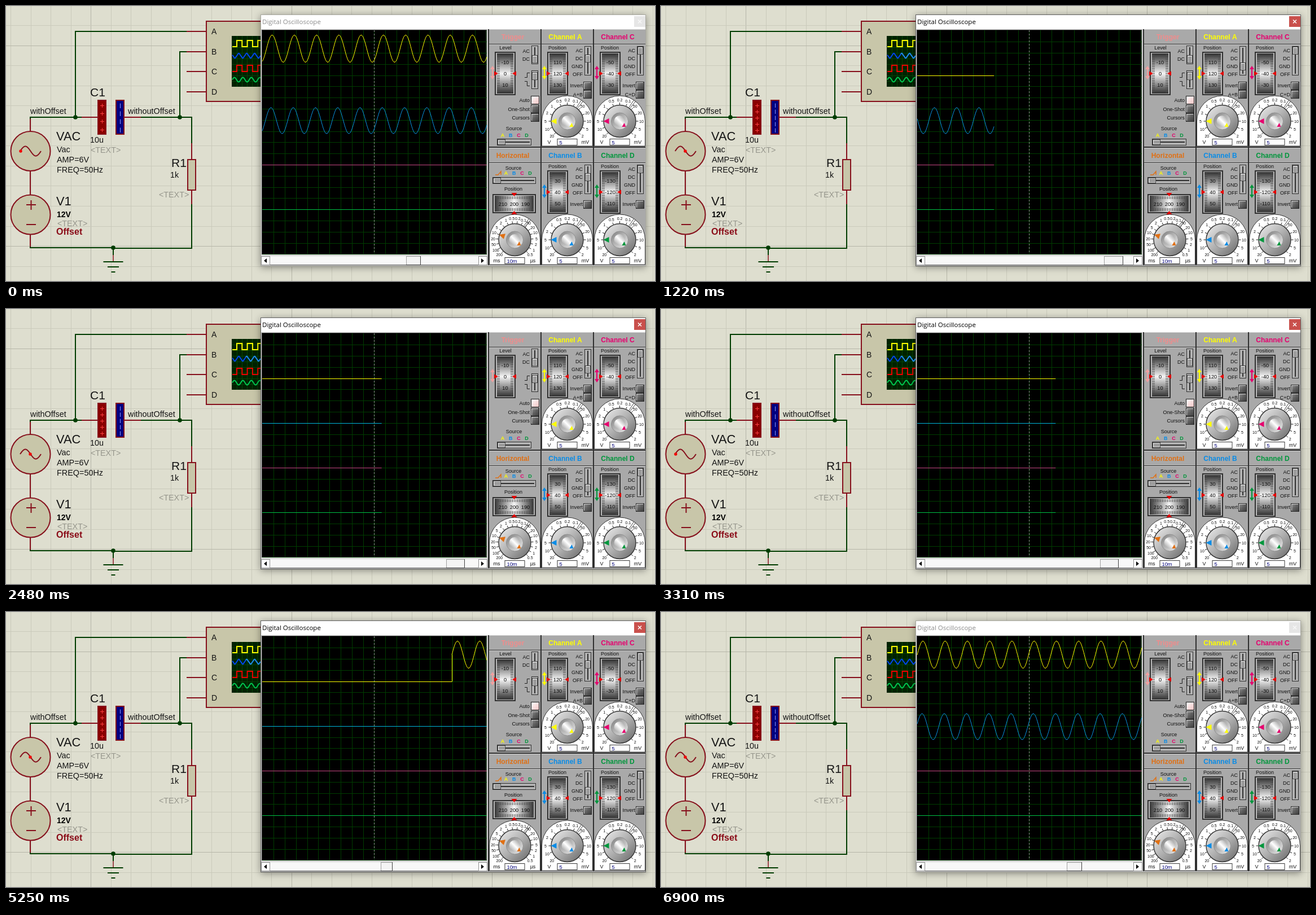
Recreate the animation shown at these times as an HTML page with a canvas. Size 1150 px wide and 487 px high, loop 6960 ms.

```html
<!DOCTYPE html>
<html lang="en">
<head>
<meta charset="utf-8">
<title>Capacitor blocking a DC offset</title>
<style>
  html, body { margin: 0; width: 100%; height: 100%; overflow: hidden; background: #dedecf; }
  canvas { display: block; }
</style>
</head>
<body>
<canvas id="stage" width="1150" height="487"></canvas>
<script>
const LOOP = 6960, TAU = Math.PI * 2;
const SANS = '"Liberation Sans", Arial, sans-serif';
const MAROON = '#86101c', WIRE = '#003c00', BODY = '#c8c6a9', PANEL = '#a9a9a9';
const YELLOW = '#ffff00', BLUE = '#0a8ce6', PINK = '#e6006e', GREEN = '#00963c', ORANGE = '#e07014';
const screen = { x: 454, y: 43, size: 398, div: 19.8, period: 39.45 };

const stage = document.getElementById('stage').getContext('2d');
const backdrop = document.createElement('canvas');
backdrop.width = 1150;
backdrop.height = 487;
let g = backdrop.getContext('2d');

// ---- drawing helpers ----
function box(x, y, w, h, fill, stroke, width = 1) {
  if (fill) { g.fillStyle = fill; g.fillRect(x, y, w, h); }
  if (stroke) {
    g.strokeStyle = stroke;
    g.lineWidth = width;
    g.strokeRect(x + width / 2, y + width / 2, w - width, h - width);
  }
}
function trace(points, color, width = 1) {
  g.beginPath();
  points.forEach(([x, y]) => g.lineTo(x, y));
  g.strokeStyle = color;
  g.lineWidth = width;
  g.stroke();
}
const line = (x1, y1, x2, y2, color, width) => trace([[x1, y1], [x2, y2]], color, width);
function polygon(points, fill) {
  g.beginPath();
  points.forEach(([x, y]) => g.lineTo(x, y));
  g.fillStyle = fill;
  g.fill();
}
function circle(x, y, r, fill, stroke, width = 1) {
  g.beginPath();
  g.arc(x, y, r, 0, TAU);
  if (fill) { g.fillStyle = fill; g.fill(); }
  if (stroke) { g.strokeStyle = stroke; g.lineWidth = width; g.stroke(); }
}
function text(s, x, y, size, color = '#141414', align = 'left', weight = '', family = SANS) {
  g.font = `${weight} ${size}px ${family}`;
  g.textAlign = align;
  g.fillStyle = color;
  g.fillText(s, x, y);
}
function curve(from, to, f, color, width) {
  const points = [];
  for (let x = from; x < to; x++) points.push([x, f(x)]);
  points.push([to, f(to)]);
  trace(points, color, width);
}
// Triangle whose tip points along the angle (y axis downwards)
function arrow(x, y, angle, length, half, color) {
  const c = Math.cos(angle), s = Math.sin(angle);
  polygon([[x + c * length, y + s * length], [x - s * half, y + c * half], [x + s * half, y - c * half]], color);
}
function gradient(x1, y1, x2, y2, ...colors) {
  const fill = g.createLinearGradient(x1, y1, x2, y2);
  colors.forEach((c, i) => fill.addColorStop(i / (colors.length - 1), c));
  return fill;
}

// ---- schematic ----
function drawGrid() {
  box(0, 0, 1150, 487, '#dedecf');
  const shade = major => major ? '#b6b6a8' : '#cacabb';
  for (let i = 0; i < 33; i++) box(Math.round(8 + i * 35.55), 0, 1, 487, shade(i % 10 === 4));
  for (let i = 0; i < 13; i++) box(0, Math.round(34 + i * 35.55), 1150, 1, shade(i % 10 === 1));
}
function drawSchematic() {
  trace([[320, 45], [123, 45], [123, 197]], WIRE, 2);
  trace([[43, 206], [43, 197], [134, 197]], WIRE, 2);
  trace([[238, 197], [329, 197], [329, 244]], WIRE, 2);
  trace([[308, 197], [308, 81], [322, 81]], WIRE, 2);
  trace([[329, 350], [329, 429], [190, 429], [190, 428], [43, 428], [43, 420]], WIRE, 2);
  line(190, 428, 190, 441, WIRE, 2);
  line(190, 441, 190, 453, MAROON, 1.5);
  [[17.5, 453], [10, 462], [3.5, 471]].forEach(([half, y]) => line(190 - half, y, 190 + half, y, WIRE, 2));
  [[123, 197], [308, 197], [190, 428]].forEach(([x, y]) => circle(x, y, 3.8, WIRE));

  [[43, 200, 43, 223], [43, 292, 43, 334], [43, 404, 43, 426], [134, 197, 162, 197], [210, 197, 239, 197],
   [329, 243, 329, 272], [329, 326, 329, 351]].forEach(p => line(...p, MAROON, 2));

  circle(43.5, 257, 35, BODY, MAROON, 2);
  circle(43.5, 369.5, 35, BODY, MAROON, 2);
  line(36, 352, 53, 352, MAROON, 2);
  line(44.5, 344, 44.5, 361, MAROON, 2);
  line(36, 387, 53, 387, MAROON, 2);
  curve(25, 62, x => 257 - 8.5 * Math.sin((x - 25) / 37 * TAU), MAROON, 2);
  box(321, 271, 16, 56, BODY, MAROON, 2);
  box(162, 166, 16, 62, '#8a0000', MAROON, 2);
  box(194, 166, 16, 62, '#000080', MAROON, 2);

  box(354, 26, 110, 144, BODY, MAROON, 2);
  ['A', 'B', 'C', 'D'].forEach((name, i) => {
    const y = Math.round(45 + i * 35.6);
    line(320, y, 355, y, MAROON, 2);
    text(name, 364, y + 5, 14);
  });
  box(400, 53, 60, 90, '#002200');
  for (let i = 1; i < 9; i++) {
    box(400 + i * 9, 53, 1, 90, '#064206');
    box(400, 53 + i * 10, 60, 1, '#064206');
  }
  for (const [y, color] of [[61, YELLOW], [105, '#f00000']]) {
    const points = [[401, y + 11]];
    for (let i = 0; i < 6; i++) {
      const x = 409 + i * 9.3, up = i % 2 ? 0 : 11;
      points.push([x, y + up], [x, y + 11 - up]);
    }
    trace(points, color, 2);
  }
  curve(401, 452, x => 130.5 - 4 * Math.sin((x - 401) / 15 * TAU), '#00c850', 2);

  text('VAC', 89, 238, 21.8);
  text('V1', 89, 353, 21.8);
  text('C1', 149, 160, 21);
  text('R1', 293, 285, 21);
  [['withOffset', 43, 191], ['withoutOffset', 216, 191], ['Vac', 90, 259], ['AMP=6V', 90, 277],
   ['FREQ=50Hz', 90, 295], ['10u', 149, 242], ['1k', 291, 304]].forEach(([s, x, y]) => text(s, x, y, 14.4));
  [[150, 260], [271, 339], [91, 390]].forEach(([x, y]) => text('<TEXT>', x, y, 14.3, '#96968c'));
  text('12V', 90, 374, 14, '#000', 'left', 'bold');
  text('Offset', 89, 405, 16, '#8a0c18', 'left', 'bold');
}

// ---- instrument panel ----
function slider(x, y, w, h, knob) {
  const tall = h > w;
  box(x, y, w, h, '#b2b2b2', '#303030');
  if (tall) box(x + w / 2 - 1, y + 3, 2, h - 6, '#303030');
  else box(x + 3, y + h / 2 - 1, w - 6, 2, '#303030');
  if (tall) {
    box(x + 1, knob - 7, w - 2, 14, '#d8d8d8', '#404040');
    for (let i = -4; i <= 4; i += 2) box(x + 3, knob + i, w - 6, 1, '#606060');
  } else {
    box(knob - 7, y + 1, 14, h - 2, '#d8d8d8', '#404040');
    for (let i = -4; i <= 4; i += 2) box(knob + i, y + 3, 1, h - 6, '#606060');
  }
}
function button(x, y, lit) {
  box(x, y, 15, 15, lit ? gradient(x, y, x + 15, y + 15, '#ffffff', '#f0c0c0') :
    gradient(x, y, x + 15, y + 15, '#9a9a9a', '#606060', '#383838'), '#282828');
  trace([[x + 1.5, y + 13], [x + 1.5, y + 1.5], [x + 13, y + 1.5]], '#d8d8d8');
}
function wheel(x, y, w, h, values) {
  const tall = h > w, shades = ['#202020', '#8c8c8c', '#f4f4f4', '#8c8c8c', '#202020'];
  box(x, y, w, h, '#b8b8b8', '#303030', 2);
  box(x + 4, y + 3, w - 8, h - 6, tall ? gradient(0, y, 0, y + h, ...shades) : gradient(x, 0, x + w, 0, ...shades));
  const length = tall ? h : w;
  for (let i = 5; i < length - 4; i += 3) {
    if (tall) [x + 4, x + w - 9].forEach(px => box(px, y + i, 5, 1, '#484848'));
    else [y + 4, y + h - 9].forEach(py => box(x + i, py, 1, 5, '#484848'));
  }
  const cx = x + w / 2, cy = y + h / 2;
  values.forEach((v, i) => {
    const shift = (i - 1) * 20;
    text(v, tall ? cx : cx + shift, tall ? cy + shift + 3 : cy + 4, 9.3, '#101010', 'center');
  });
  if (tall) {
    arrow(x - 1, cy, 0, 7, 4, '#e60000');
    arrow(x + w + 1, cy, Math.PI, 7, 4, '#e60000');
  } else {
    arrow(cx, y - 2, Math.PI / 2, 6, 5, '#e60000');
    arrow(cx, y + h + 2, -Math.PI / 2, 6, 5, '#e60000');
  }
}
function levelArrows(x, y, color) {
  line(x, y - 7, x, y + 7, color, 2);
  arrow(x, y - 6, -Math.PI / 2, 6, 4, color);
  arrow(x, y + 6, Math.PI / 2, 6, 4, color);
}
function dial(cx, cy, labels, color, pointer, units, value) {
  g.beginPath();
  g.arc(cx, cy, 45, Math.PI, 0);
  g.lineTo(cx + 45, cy + 44);
  g.lineTo(cx - 45, cy + 44);
  g.closePath();
  g.fillStyle = '#fff';
  g.fill();
  g.strokeStyle = '#303030';
  g.lineWidth = 1;
  g.stroke();

  labels.split(' ').forEach((label, i, all) => {
    const angle = (225 - 270 * i / (all.length - 1)) / 360 * TAU;
    const c = Math.cos(angle), s = -Math.sin(angle);
    line(cx + c * 29, cy + s * 29, cx + c * 33, cy + s * 33, '#202020');
    text(label, cx + c * 38.5, cy + s * 38 + 2.5, 7, '#101010', 'center');
  });
  for (const angle of [-0.98, -0.9]) {
    const c = Math.cos(angle), s = Math.sin(angle);
    line(cx + c * 30, cy + s * 30, cx + c * 45, cy + s * 45, '#404040');
  }
  circle(cx, cy, 28.5, gradient(cx - 20, cy - 20, cx + 20, cy + 20, '#dcdcdc', '#b0b0b0', '#7c7c7c'), '#383838', 1.5);
  circle(cx, cy, 15, gradient(cx - 11, cy - 11, cx + 11, cy + 11, '#8c8c8c', '#b8b8b8', '#e0e0e0'), '#909090');
  circle(cx, cy, 10, gradient(cx - 8, cy + 8, cx + 8, cy - 8, '#a4a4a4', '#ffffff', '#a4a4a4'));
  arrow(cx + Math.cos(pointer) * 19, cy + Math.sin(pointer) * 19, pointer, 10, 5, color);
  polygon([[cx + 4, cy + 10], [cx + 8, cy + 3], [cx + 11, cy + 10]], color);

  box(cx - 18, cy + 31, 36, 12, '#fff', '#383838');
  text(value, cx - 14, cy + 41, 9.3, '#000078');
  text(units[0], cx - 32, cy + 40, 9, '#101010', 'center');
  text(units[1], cx + 32, cy + 40, 9, '#101010', 'center');
}
function sourceLetters(x, y) {
  [['A', YELLOW], ['B', BLUE], ['C', PINK], ['D', GREEN]]
    .forEach(([s, c], i) => text(s, x + i * 14.2, y, 9, c, 'center', 'bold'));
}
function panel(x, y, title, color) {
  box(x, y, 91, 208, PANEL);
  box(x, y, 91, 1, '#d0d0d0');
  box(x, y + 26, 91, 1, '#303030');
  box(x, y + 27, 91, 1, '#d0d0d0');
  text(title, x + 42, y + 18, 12, color, 'center', 'bold');
}
function channel(x, y, name, color, values, knob, sumLabel) {
  panel(x, y, 'Channel ' + name, color);
  text('Position', x + 28, y + 36, 9, '#101010', 'center');
  wheel(x + 10, y + 40, 37, 77, values);
  levelArrows(x + 5, y + 77, color);
  ['AC', 'DC', 'GND', 'OFF'].forEach((s, i) => text(s, x + 73, y + 41 + i * 14, 9, '#101010', 'right'));
  slider(x + 76, y + 30, 12, 52, y + knob);
  text('Invert', x + 73, y + 103, 9, '#101010', 'right');
  button(x + 74, y + 93);
  if (sumLabel) {
    text(sumLabel, x + 73, y + 119, 9, '#101010', 'right');
    button(x + 74, y + 108);
  }
  dial(x + 45.5, y + 163, '20 10 5 2 1 0.5 0.2 0.1 50 20 10 5 2', color, Math.PI, ['V', 'mV'], '5');
}
function drawWindow() {
  g.shadowColor = 'rgba(0, 0, 0, 0.4)';
  g.shadowBlur = 12;
  g.shadowOffsetY = 2;
  box(451, 15, 683, 446, '#c8c8c8');
  g.shadowColor = 'transparent';
  box(452, 16, 681, 25, '#fff');
  box(854, 41, 279, 418, '#303030');
  box(452, 41, 402, 418, '#d8d8d8');
}
function drawPanels() {
  panel(856, 41, 'Trigger', '#f08c8c');
  text('Level', 885, 77, 9, '#101010', 'center');
  wheel(866, 81, 37, 77, ['-10', '0', '10']);
  levelArrows(862, 118, '#f0a0a0');
  text('AC', 928, 83, 9, '#101010', 'right');
  text('DC', 928, 97, 9, '#101010', 'right');
  slider(931, 70, 12, 33, 94);
  slider(931, 114, 12, 33, 124);
  trace([[919, 126.5], [923.5, 126.5], [923.5, 118.5], [928, 118.5]], '#202020');
  trace([[919, 133.5], [923.5, 133.5], [923.5, 141.5], [928, 141.5]], '#202020');
  ['Auto', 'One-Shot', 'Cursors'].forEach((s, i) => {
    text(s, 928, 170 + i * 15.6, 9, '#101010', 'right');
    button(930, Math.round(159 + i * 15.6), i === 0);
  });
  text('Source', 900, 220, 9, '#101010', 'center');
  sourceLetters(880, 232);
  slider(870, 235, 61, 12, 878);

  panel(856, 251, 'Horizontal', ORANGE);
  text('Source', 899, 290, 9, '#101010', 'center');
  trace([[867, 299], [872, 299], [877, 293], [877, 299]], ORANGE, 1.5);
  sourceLetters(886, 299);
  slider(862, 303, 77, 12, 870);
  text('Position', 899, 327, 9, '#101010', 'center');
  wheel(862, 333, 77, 34, ['210', '200', '190']);
  dial(901.5, 414, '200 100 50 20 10 5 2 1 0.5 0.2 0.1 50 20 10 5 2 1 0.5', ORANGE, 3.46, ['ms', 'µs'], '10m');

  channel(949, 41, 'A', YELLOW, ['110', '120', '130'], 52, 'A+B');
  channel(1042, 41, 'C', PINK, ['-50', '-40', '-30'], 38, 'C+D');
  channel(949, 251, 'B', BLUE, ['30', '40', '50'], 52);
  channel(1042, 251, 'D', GREEN, ['-130', '-120', '-110'], 38);
}
function drawEmptyScreen() {
  const { x, y, size, div } = screen;
  box(x - 1, y - 1, size + 1, size, '#000', '#404040');
  for (let i = 1; i <= 20; i++) {
    box(Math.ceil(x + i * div), y, 1, size - 2, '#003c00');
    box(x, Math.ceil(y + i * div), size, 1, '#003c00');
  }
  g.setLineDash([3, 3]);
  line(652.5, y, 652.5, y + size - 2, '#909c90');
  g.setLineDash([]);

  box(452, 443, 401, 16, '#f8f8f8');
  box(452, 458, 401, 1, '#606060');
  box(452, 443, 16, 16, '#fff', '#909090');
  box(837, 443, 16, 16, '#fff', '#909090');
  arrow(462, 451, Math.PI, 5, 4, '#000');
  arrow(842, 451, 0, 5, 4, '#000');
}

// ---- moving parts ----
// Sweeps: start time, position of a crest on channels A and B (null = grounded), and where A is reconnected
const sweeps = [
  { start: -905, a: 471.5, b: 469.5 },
  { start: 320, a: 471.5, b: 469.5 },
  ...[1140, 1545].map(start => ({ start, a: null, b: 484.5 })),
  ...[1950, 2355, 2760, 3165].map(start => ({ start, a: null, b: null })),
  { start: 3570, a: 800, b: null, joinA: 790 },
  { start: 6140, a: 464, b: 462.5 }
];
const SWEEP_SPEED = 1.68; // px per ms

function signal(crest, mid, amp, ground, from, to, color) {
  if (crest === null) return line(screen.x, ground, to, ground, color);
  const wave = x => mid - amp * Math.cos((x - crest) / screen.period * TAU);
  if (from > screen.x) {
    line(screen.x, ground, Math.min(from, to), ground, color);
    if (to <= from) return;
    line(from + 0.5, ground, from + 0.5, wave(from), color);
  }
  curve(from, to, wave, color);
}
function drawScreen(t) {
  const sweep = sweeps.filter(s => s.start <= t).pop();
  const elapsed = t - sweep.start;
  const end = Math.min(screen.x + screen.size, screen.x + elapsed * SWEEP_SPEED);
  signal(sweep.a, 75.5, 24, 123.5, sweep.joinA || screen.x, end, YELLOW);
  signal(sweep.b, 203, 23, 202.5, screen.x, end, sweep.b === null ? '#00b4dc' : '#0a96e6');
  line(screen.x, 281.5, end, 281.5, '#c84682');
  line(screen.x, 360.5, end, 360.5, '#00c046');

  // The recording grows, so its visible page takes an ever smaller share of the scrollbar
  const page = 368 / (10.5 + elapsed * 0.0042);
  const x = Math.round(468 + page * 9.35), w = Math.round(page);
  box(x, 443, w, 16, '#f4f4f4', '#a0a0a0');
  box(x, 458, w, 1, '#303030');
  box(x + w - 1, 443, 1, 16, '#404040');
}
function drawTitle(active) {
  box(451, 15, 683, 446, null, active ? '#606060' : '#a8a8a0');
  text('Digital Oscilloscope', 454, 32, 11.5, active ? '#000' : '#8c8c8c', 'left', '', '"Open Sans", sans-serif');
  box(1113, 18, 20, 19, active ? '#c9504c' : '#e6e6e6');
  const cross = active ? '#fff' : '#f8f8f8';
  line(1120, 24.5, 1126, 30.5, cross, 1.5);
  line(1126, 24.5, 1120, 30.5, cross, 1.5);
}
function drawCharges(t) {
  const rest = (t + 62) % 259 < 120;
  circle(rest ? 26 : 43, 257, 2.7, '#f00000');
  const count = rest ? 4 : 5, step = rest ? 14.2 : 11;
  for (let i = 0; i < count; i++) {
    const y = Math.round(176 + i * step) + 0.5;
    line(167, y, 174, y, '#ff4040');
    line(170.5, y - 3.5, 170.5, y + 3.5, '#ff4040');
    line(202.5, y - 4, 202.5, y + (rest ? 4.5 : 3.5), '#8c96ff');
  }
}
function zigzag(from, to, color) {
  curve(from, to, x => 88 + 5 * Math.asin(Math.sin((x - 402) / 14 * TAU)) / (Math.PI / 2), color, 2);
}
function render(t) {
  const active = t >= 1100 && t < 6350;
  g.drawImage(backdrop, 0, 0);
  drawCharges(t);
  zigzag(401, 425, '#0046f0');
  zigzag(425, 451, active ? '#1e8cf5' : '#0046f0');
  drawTitle(active);
  drawScreen(t);
  slider(1025, 71, 12, 52, t >= 1140 && t < 3770 ? 107 : 93);
  slider(1025, 281, 12, 52, t >= 1950 && t < 6140 ? 317 : 303);
}

drawGrid();
drawSchematic();
drawWindow();
drawPanels();
drawEmptyScreen();
g = stage;

const began = performance.now();
function tick() {
  render((performance.now() - began) % LOOP);
  requestAnimationFrame(tick);
}
tick();
</script>
</body>
</html>
```
